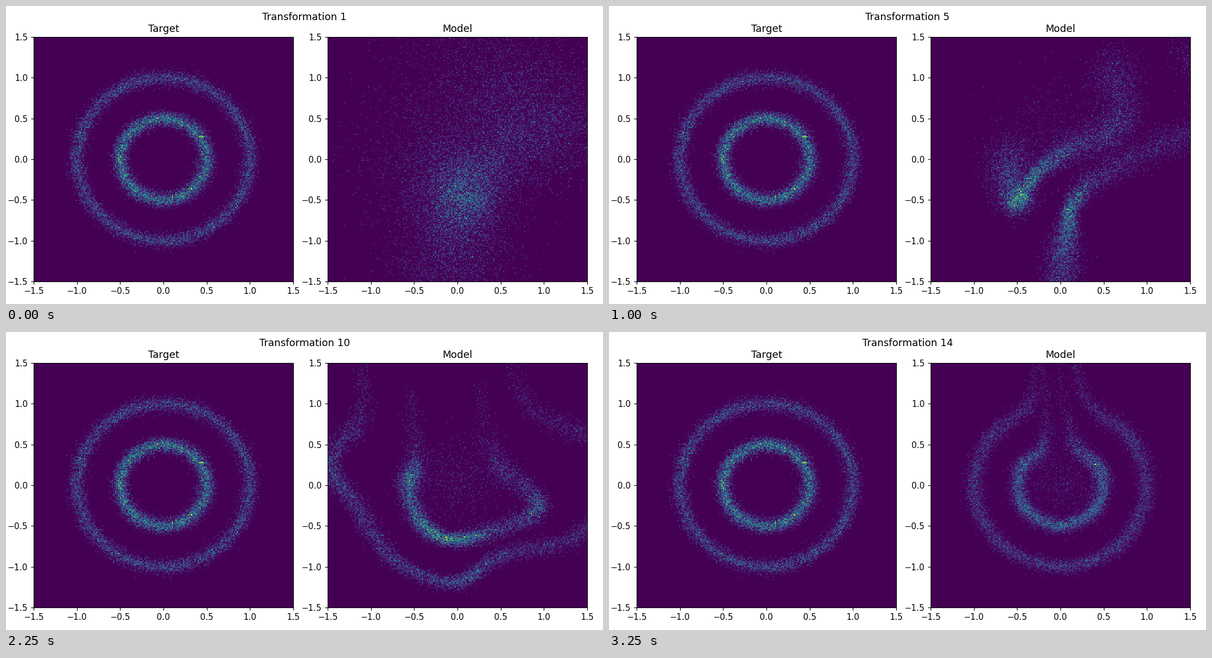
A matplotlib script that plays this animation: 1058 px wide and 529 px high, repeating every 3500 ms.

```python
import numpy as np
import matplotlib.pyplot as plt
from matplotlib.animation import FuncAnimation

W, H, DPI = 1058, 529, 105.8
LIM, BINS, STEPS = 1.5, 300, 14
KEYS = [1, 3, 5, 7, 10, 12, 14]  # steps at which the rings are posed
COUNT = 9600                     # points per ring

rng = np.random.default_rng(4)


def gauss(n):
    return rng.normal(size=n) + 1j * rng.normal(size=n)


def arc(radius, n):
    """Final pose: a circle that is open at the top."""
    return radius * np.exp(1j * np.radians(np.linspace(100, 440, n)))


# Points of the plane are complex numbers; knots run anticlockwise from the top.
INNER = np.array([
    [-.35, -.2-.2j, -.45j, .15-.5j, .1-.1j, .8+.35j, .15+1.2j],
    [-.5-.1j, -.5-.35j, -.38-.45j, -.15-.2j, .2+.15j, .6+.6j, .1+1.2j],
    [-.6+.1j, -.58-.3j, -.5-.55j, -.3-.2j, .1+.12j, .7+.45j, .6+1.2j],
    [-.5+.6j, -.62+.1j, -.5-.2j, -.3-.3j, .15-.22j, .85-.02j, .75+.6j],
    [-.45+.25j, -.57, -.43-.45j, -.12-.66j, .3-.6j, .95-.25j, .35+.3j],
    [.27j, -.45+.05j, -.45-.4j, -.1-.68j, .4-.55j, 1.1+.05j, .3+.4j],
    arc(.5, 7)])

OUTER = np.array([
    [-.2-1.8j, -.1-1.5j, -.05-1.15j, -.85j, .1-.4j, .7+.2j, 1.35+.4j, .9+.85j, .1+1.2j],
    [-.2-2j, -1.6j, .1-1.2j, .2-.9j, .3-.65j, .7-.35j, 1.2+.3j, 1.8+1.1j, 1.1+1.5j],
    [-.1-2.1j, -1.6j, .02-1.2j, .08-.9j, .12-.6j, .4-.25j, 1.2+.2j, 1.9+.5j, 1.5+1.4j],
    [-1.7-2j, -1.2-1.7j, -.8-1.4j, -.4-1.1j, .3-.75j, .6-.53j, 1.5-.33j, 2.2+.4j, 1.7+1.3j],
    [-1+.8j, -1.5+.3j, -1.2-.2j, -.75-.9j, -.05-1.2j, .5-.87j, 1.5-.55j, 1.9+.4j, .65+.85j],
    [-.25+.65j, -1.25+.3j, -1-.3j, -.6-.95j, -1.2j, .75-.7j, 1.5-.05j, 1.7+.75j, .5+.8j],
    arc(1, 9)])

rings = [(poses, rng.random(COUNT), gauss(COUNT)) for poses in (INNER, OUTER)]
haze = gauss(800)


def spline(knots, u):
    """Catmull-Rom curve through the rows of knots, u from 0 to 1."""
    p = np.concatenate([knots[:1], knots, knots[-1:]])
    s = np.atleast_1d(u) * (len(knots) - 1)
    i = np.minimum(s.astype(int), len(knots) - 2)
    t = (s - i).reshape((-1,) + (1,) * (knots.ndim - 1))
    a, b, c, d = (p[i + k] for k in range(4))
    return b + .5 * t * (c - a + t * (2*a - 5*b + 4*c - d + t * (3*(b - c) + d - a)))


def model(step):
    time = np.interp(step, KEYS, np.linspace(0, 1, len(KEYS)))
    blur = .13 * np.exp((1 - step) / .8)
    fade = np.exp((1 - step) / 4)
    pull = np.clip((step - 7) / 5, 0, 1)

    clouds = [haze * (.23 + .4 * fade) + .7j * fade]
    for poses, u, noise in rings:
        # the open ends are drawn out into streaks at the top
        tip = pull * np.exp(-np.minimum(u, 1 - u) / .015)
        spread = (.048 + blur + .3 * fade * np.abs(2*u - 1)) * (1 - .7 * tip)
        curve = spline(spline(poses, time)[0], u)
        clouds.append(curve + spread * noise + (1.6j - .19) * tip)
    return np.concatenate(clouds)


def target():
    radius = np.repeat([1, .5], 10000)
    turn = rng.uniform(0, 2 * np.pi, radius.size)
    return radius * np.exp(1j * turn) + .05 * gauss(radius.size)


def counts(z):
    return np.histogram2d(z.imag, z.real, bins=BINS, range=[(-LIM, LIM)] * 2)[0]


def panel(left, title, points):
    ax = fig.add_axes([left / W, 40 / H, 460 / W, 434 / H])
    ax.set_title(title)
    return ax.imshow(counts(points), origin='lower', aspect='auto', cmap='viridis',
                     interpolation='nearest', extent=(-LIM, LIM, -LIM, LIM))


fig = plt.figure(figsize=(W / DPI, H / DPI), dpi=DPI, facecolor='white')
panel(49, 'Target', target())
image = panel(570, 'Model', model(1))
heading = fig.suptitle('')


def draw(frame):
    step = frame + 1
    grid = counts(model(step))
    image.set_data(grid)
    image.set_clim(0, grid.max())
    heading.set_text(f'Transformation {step}')
    return image, heading


anim = FuncAnimation(fig, draw, frames=STEPS, interval=250, repeat=True, repeat_delay=0)
plt.show()
```
